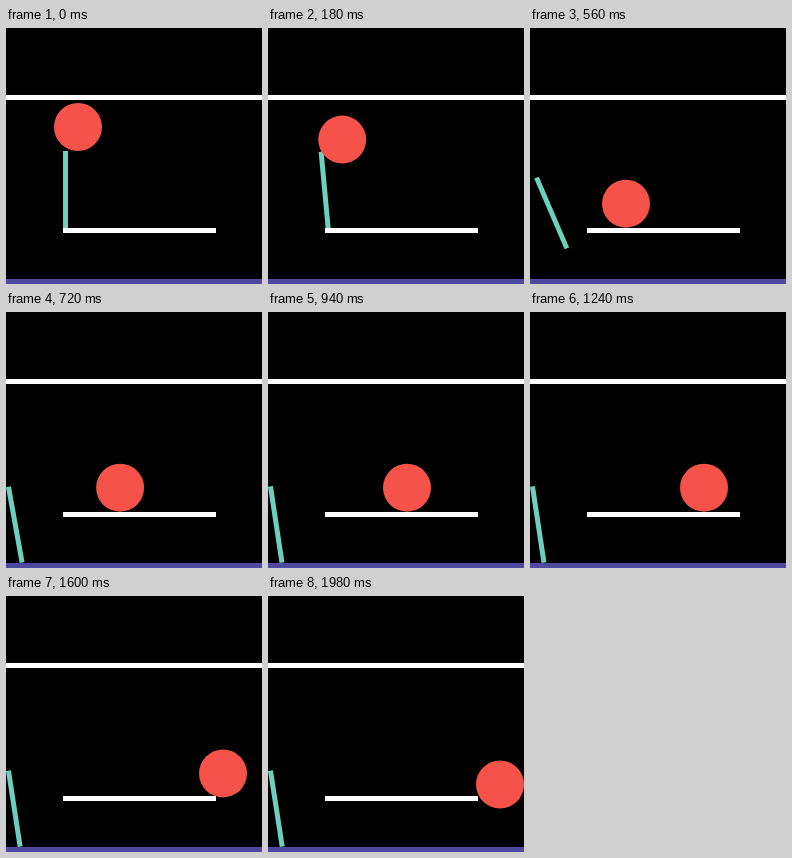
An HTML page with a canvas that plays this animation: 256x256 px, repeating every 2 s.

```html
<!DOCTYPE html>
<html>
<head>
<meta charset="utf-8">
<title>Falling ball</title>
<style>
html, body { margin: 0; width: 100%; height: 100%; overflow: hidden; background: #000; }
canvas { display: block; width: 256px; height: 256px; }
</style>
</head>
<body>
<canvas id="stage" width="256" height="256"></canvas>
<script>
const ctx = document.getElementById('stage').getContext('2d');
const LOOP = 2000, STEP = 20, G = 0.0005;
const FLOOR = 251, HALF = 38.5, THICK = 5, RADIUS = 24;
const RAD = Math.PI / 180;

// Linear interpolation through [time, value] pairs.
function track(keys, t) {
  if (t <= keys[0][0]) return keys[0][1];
  for (let i = 1; i < keys.length; i++) {
    const [a, u] = keys[i - 1], [b, v] = keys[i];
    if (t <= b) return u + (v - u) * (t - a) / (b - a);
  }
  return keys[keys.length - 1][1];
}

const rollX = [[70, 72], [320, 77], [421, 79], [560, 96], [940, 139],
  [1080, 155], [1240, 174], [1600, 217], [1720, 232]];

function ballAt(t) {
  const x = track(rollX, t);
  let y;
  if (t < 70) {
    y = 99 + G * t * t;
  } else if (t < 421) {
    const d = t - 70;
    y = 101.5 + 0.037 * d + G * d * d;
  } else {
    // Rolls along the platform, tips over its end and wedges at the wall.
    const off = Math.max(0, x - 210);
    y = 175.7 + 12.8 * Math.pow(off / 22, 1.75);
  }
  return { x, y: t < 421 ? Math.min(y, 175.7) : y };
}

function barAngle(t) {
  if (t < 70) return 0;
  if (t < 320) return 15.3 * Math.pow((t - 70) / 250, 1.3);
  if (t < 595) return 15.3 + 0.033 * (t - 320);
  if (t < 675) return 24.4 - 0.125 * (t - 595);
  const u = Math.min(1, (t - 675) / 95);
  return 14.4 - 5.8 * (1 - (1 - u) * (1 - u)) + 0.2 * Math.max(0, t - 1240) / 740;
}

function barAt(t) {
  const deg = barAngle(t), a = deg * RAD;
  const wall = HALF * Math.sin(a) + THICK / 2 * Math.cos(a);
  const rest = FLOOR - HALF * Math.cos(a) - THICK / 2 * Math.sin(a);
  let x = 59.5, y = 161.5;
  if (t > 70 && t <= 320) {
    const u = (t - 70) / 250;
    x -= 9.75 * Math.pow(u, 1.5);
    y += 1.5 * u;
  } else if (t > 320) {
    const d = t - 320;
    x = t < 595 ? Math.max(wall, 49.75 - 0.117 * d) : wall;
    y = t < 560
      ? 163 + 22 * Math.pow(d / 240, 2)
      : 185 + 0.2 * (t - 560) + G * (t - 560) ** 2;
    y = Math.min(y, rest);
  }
  return { x, y, a };
}

function rect(color, x, y, w, h) {
  ctx.fillStyle = color;
  ctx.fillRect(x, y, w, h);
}

function draw(t) {
  rect('#000', 0, 0, 256, 256);

  const bar = barAt(t);
  ctx.save();
  ctx.translate(bar.x, bar.y);
  ctx.rotate(-bar.a);
  rect('#6dd0bc', -THICK / 2, -HALF, THICK, HALF * 2);
  ctx.restore();

  const ball = ballAt(t);
  ctx.fillStyle = '#f5524a';
  ctx.beginPath();
  ctx.arc(ball.x, ball.y, RADIUS, 0, Math.PI * 2);
  ctx.fill();

  rect('#fff', 0, 67, 256, 5);
  rect('#fff', 57, 200, 153, 5);
  rect('#5049a0', 0, FLOOR, 256, 5);
}

const start = performance.now();
function frame() {
  const t = (performance.now() - start) % LOOP;
  draw(Math.floor(t / STEP) * STEP);
  requestAnimationFrame(frame);
}
frame();
</script>
</body>
</html>
```
